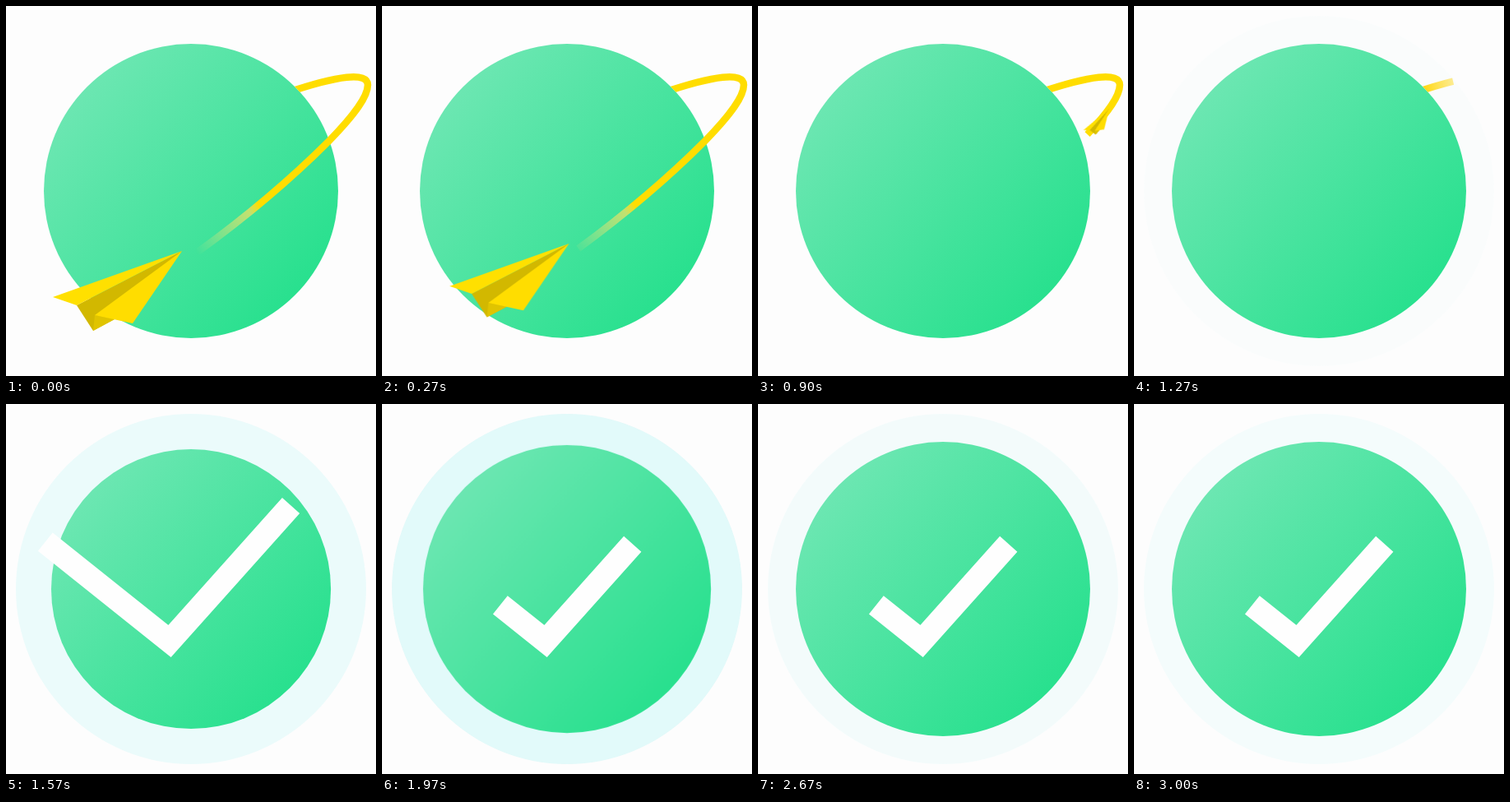
These frames come from a looping animation (450x450 px, 3.03 s). An HTML page:

```html
<!DOCTYPE html>
<html lang="en">
<head>
<meta charset="utf-8">
<title>Sent</title>
<style>
  html, body { margin: 0; width: 100%; height: 100%; overflow: hidden; background: #fdfdfd; }
  svg { display: block; width: 100%; height: 100%; }

  .halo, .disc, .trail, .plane, .dash, .check {
    animation-duration: 3030ms;
    animation-iteration-count: infinite;
    animation-timing-function: linear;
  }

  .halo { fill: #e2fafa; animation-name: halo; }
  @keyframes halo {
    0%, 39.6% { opacity: 0; }
    41.91% { opacity: .1; }
    51.82% { opacity: .65; }
    58%, 65.02% { opacity: 1; }
    78.22% { opacity: .4; }
    100% { opacity: .32; }
  }

  .disc { transform-origin: 225px 225px; animation-name: disc; animation-timing-function: ease-in-out; }
  @keyframes disc {
    0%, 41.91% { transform: scale(1); }
    51.82% { transform: scale(.95); }
    76.5%, 100% { transform: scale(1); }
  }

  /* The line is eaten up from its near end as the plane passes. */
  .trail { fill: none; stroke-width: 8.5; stroke-dasharray: 400 500; }
  .near { stroke: url(#nearFade); animation-name: erase, nearOut; }
  .far { stroke: url(#farFade); animation-name: erase, farIn; }
  @keyframes erase {
    0% { stroke-dashoffset: 0; animation-timing-function: cubic-bezier(.5, 0, .8, .5); }
    17.49% { stroke-dashoffset: -40; }
    29.7% { stroke-dashoffset: -220; }
    41.91% { stroke-dashoffset: -350; }
    46.2%, 100% { stroke-dashoffset: -401; }
  }
  @keyframes nearOut {
    0%, 36% { opacity: 1; }
    41%, 100% { opacity: 0; }
  }
  @keyframes farIn {
    0%, 36% { opacity: 0; }
    41%, 100% { opacity: 1; }
  }

  .plane {
    transform-origin: 0 0;
    offset-path: path("M214 298L278 255C330 219 360 197 393 164C425 131 440 110 440 96C440 80 405 84 340 106L300 120");
    offset-rotate: auto 33.9deg;
    animation-name: fly, shrink;
  }
  @keyframes fly {
    0% { offset-distance: 0px; animation-timing-function: cubic-bezier(.5, 0, .8, .5); }
    17.49% { offset-distance: 77.1px; }
    40.92%, 100% { offset-distance: 100%; }
  }
  @keyframes shrink {
    0% { transform: scale(1); visibility: visible; animation-timing-function: cubic-bezier(.5, 0, .8, .5); }
    17.49% { transform: scale(.635); }
    25.08% { transform: scale(.3); }
    40.9% { transform: scale(.12); visibility: visible; }
    40.92%, 100% { transform: scale(.12); visibility: hidden; }
  }

  .dash { stroke: #fff; stroke-width: 2.4; stroke-linecap: round; animation-name: dash; }
  @keyframes dash {
    0%, 10% { transform: translate(30px, -25px); opacity: 0; }
    14% { opacity: 1; }
    17.49% { transform: translate(0, 0); opacity: 1; }
    24%, 100% { transform: translate(-42px, 35px); opacity: 0; }
  }

  .check { fill: none; stroke: #fefefe; stroke-width: 28.5; stroke-miterlimit: 10; animation-name: check; }
  @keyframes check {
    0%, 42.5% { stroke-dasharray: 0 900; stroke-dashoffset: 0; visibility: hidden; }
    42.6% { stroke-dasharray: 0 900; stroke-dashoffset: 0; visibility: visible; }
    51.82% { stroke-dasharray: 415 900; stroke-dashoffset: 0; animation-timing-function: ease-in-out; }
    61.06%, 100% { stroke-dasharray: 229.3 900; stroke-dashoffset: -123; visibility: visible; }
  }
</style>
</head>
<body>
<svg viewBox="0 0 450 450">
  <defs>
    <linearGradient id="green" x1=".08" y1=".12" x2=".92" y2=".88">
      <stop offset="0" stop-color="#70e7b4"/>
      <stop offset="1" stop-color="#24e08c"/>
    </linearGradient>
    <linearGradient id="nearFade" gradientUnits="userSpaceOnUse" x1="232" y1="300" x2="308" y2="243">
      <stop offset="0" stop-color="#ffe680" stop-opacity="0"/>
      <stop offset=".85" stop-color="#f0e060" stop-opacity=".75"/>
      <stop offset="1" stop-color="#ffdd00"/>
    </linearGradient>
    <linearGradient id="farFade" gradientUnits="userSpaceOnUse" x1="355" y1="100" x2="410" y2="85">
      <stop offset="0" stop-color="#ffd91a"/>
      <stop offset="1" stop-color="#ffe14d" stop-opacity=".25"/>
    </linearGradient>
    <!-- Hides whatever passes behind the disc's upper right edge -->
    <clipPath id="front">
      <path d="M450 0V450H0V140H382.5A179 179 0 0 0 225 46V0Z"/>
    </clipPath>
    <path id="route" pathLength="400" d="M232 300C290 258 345 212 393 164C425 131 440 110 440 96C440 80 405 84 340 106"/>
  </defs>

  <circle class="halo" cx="225" cy="225" r="213"/>
  <circle class="disc" cx="225" cy="225" r="179" fill="url(#green)"/>

  <g clip-path="url(#front)">
    <use class="trail near" href="#route"/>
    <use class="trail far" href="#route"/>
    <path class="dash" d="M151.5 342L163.5 332M192.500 327.500L196.500 323.500M195.500 349L203.500 342.500"/>
    <g class="plane">
      <path fill="#d2b800" d="M0 0L-128 66L-108 97L-82 83Z"/>
      <path fill="#e0c400" d="M-108 97L-106 78L-82 83Z"/>
      <path fill="#ffe000" d="M0 0L-157 56L-128 66Z"/>
      <path fill="#ffdd00" d="M0 0L-106 78L-60 88Z"/>
    </g>
  </g>

  <path class="check" d="M47.8 167.500L199 288.500L359 109.600"/>
</svg>
</body>
</html>
```
